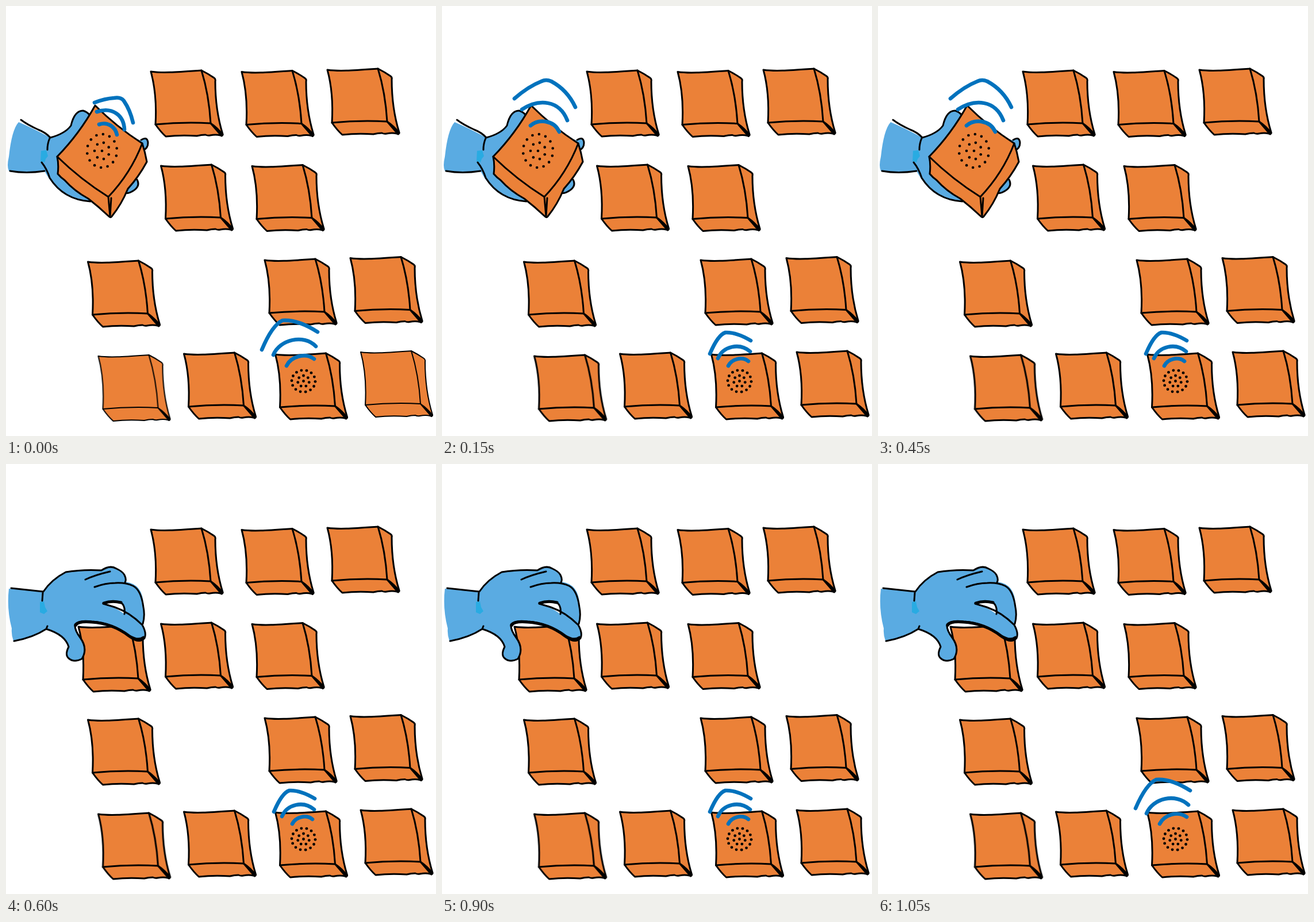
These frames come from a looping animation (748x748 px, 1200 ms). An HTML page:

```html
<!DOCTYPE html>
<html lang="en">
<head>
<meta charset="utf-8">
<title>Sounding tiles</title>
<style>
  html, body { margin: 0; width: 100%; height: 100%; overflow: hidden; background: #fff; }
  svg { display: block; width: 100vw; height: 100vh; }
  path, use { stroke-linecap: round; stroke-linejoin: round; }
  .ink { fill: none; stroke: #000; stroke-width: 3; }
  .clay { fill: #eb8138; }
  .glove { fill: #5aabe2; }
  .shade { fill: #29abe2; }
  .waves { fill: none; stroke: #0072bd; stroke-width: 6.6; }

  .held, .placing, .call-near, .call-far, .reply-wide, .reply-low, .reply-late, .fine, .bold {
    animation: 1.2s step-end infinite;
  }
  .held { animation-name: first-half; }
  .placing { animation-name: second-half; }
  .call-near, .reply-wide, .fine { animation-name: even-beats; }
  .call-far { animation-name: odd-beats; }
  .bold { animation-name: all-but-even; }
  .reply-low { animation-name: low-beats; }
  .reply-late { animation-name: late-beats; }

  @keyframes first-half { 0% { opacity: 1 } 50%, 100% { opacity: 0 } }
  @keyframes second-half { 0% { opacity: 0 } 50%, 100% { opacity: 1 } }
  @keyframes even-beats { 0%, 25% { opacity: 1 } 12.5%, 37.5%, 100% { opacity: 0 } }
  @keyframes odd-beats { 0%, 25%, 50%, 100% { opacity: 0 } 12.5%, 37.5% { opacity: 1 } }
  @keyframes all-but-even { 0%, 25% { opacity: 0 } 12.5%, 37.5%, 100% { opacity: 1 } }
  @keyframes low-beats { 0%, 25%, 62.5%, 87.5%, 100% { opacity: 0 } 12.5%, 37.5%, 75% { opacity: 1 } }
  @keyframes late-beats { 0%, 75%, 100% { opacity: 0 } 62.5%, 87.5% { opacity: 1 } }
</style>
</head>
<body>
<svg viewBox="0 0 748 748" xmlns="http://www.w3.org/2000/svg">
  <defs>
    <g id="tile">
      <path class="clay" stroke="#000" d="M0 0C20 3 45 1 88-2Q100 4 110 11Q113 13 112 17Q112 67 125 109Q125 113 121 111Q113 109 103 111Q99 112 95 110Q88 110 80 112Q52 110 26 113Q17 105 8 92Q11 40 0 0Z"/>
      <path fill="none" stroke="#000" d="M88-2Q101 40 104 90Q56 87.5 8 92"/>
      <path stroke="#000" d="M104 90Q116 98 125 110L123 112Z"/>
    </g>
  </defs>

  <g id="tiles" stroke-width="3"></g>

  <g class="held">
    <path class="glove" d="M22 202Q48 213 77 229Q103 222 113 208Q119 182 134 182Q141 184 146 190L165 210L235 234Q247 228 247 238Q247 248 239 251L220 300L228 302Q234 313 222 322Q211 328 205 325L147 340Q107 338 85 313Q73 299 67 287Q35 291 5 287Q1 279 5 262Q10 215 22 202Z"/>
    <path class="shade" d="M61 252L70 251L73 261L69 266L67 272L60 270Z"/>
    <path class="ink" d="M26 198Q38 207 56 215Q69 220 77 229Q103 222 113 208Q119 182 134 182Q141 184 146 190M76 230Q72 239 72 250M7 287Q35 292 67 287M62 272Q71 283 76 299Q100 337 147 340M235 233Q246 226 247 238Q247 247 239 251M228 302Q234 313 222 321Q213 327 207 325"/>
    <path class="clay" stroke="#000" stroke-width="3" d="M155 173Q192 210 237 239Q242 254 245 271Q231 297 212 318Q201 345 184 366Q182 369 179 366Q161 349 143 335Q119 322 102 303Q95 298 90 292Q92 276 89 262Q128 222 155 173Z"/>
    <path class="ink" d="M89 262Q130 302 178 332Q217 291 237 239M178 332L181 366L183 334"/>
    <g id="held-holes"></g>
    <g class="waves">
      <path class="call-near" d="M154 168Q172 161 188 160Q200 158 205 165Q216 181 221 203M158 184C185 175 205 190 206 215M162 206C177 201 190 210 193 224"/>
      <path class="call-far" d="M126 161Q150 140 173 131Q181 127 190 131Q218 146 232 176M139 180C168 161 204 163 218 199M154 208C168 196 195 198 204 219"/>
    </g>
  </g>

  <g class="placing">
    <use href="#tile" x="126" y="283" stroke-width="3"/>
    <path class="glove" fill-rule="evenodd" d="M5 217Q37 217 65 222Q79 201 104 188Q134 183 166 185Q181 175 192 182Q208 190 208 205Q240 209 239 249Q242 264 238 278Q245 294 241 303Q232 313 215 301Q185 276 149 274Q127 271 120 279Q119 289 129 302Q143 321 132 339Q118 346 108 337Q104 328 109 318Q103 297 70 287Q47 302 13 308Q9 297 10 286Q1 252 5 217ZM169 243Q181 238 200 241Q208 247 206 261Q190 249 169 243Z"/>
    <path class="shade" d="M59 240L66 239L68 249L72 256L66 261L59 258Z"/>
    <path class="ink" d="M9 216Q37 219 65 222Q79 201 104 188Q134 183 166 185Q181 175 192 182Q203 187 206 193Q210 201 207 206M138 201Q155 193 181 187M63 238L64 224M14 308Q47 302 70 287L72 282M70 287Q103 297 109 318Q102 332 109 338Q118 346 132 339Q143 321 129 302Q119 289 120 279Q127 271 149 274Q185 276 215 301Q232 313 241 303Q245 294 237 280Q215 258 189 249L169 243Q181 238 200 241Q208 247 206 261M154 214Q173 207 190 207Q208 206 221 212Q235 219 239 249Q242 264 238 278"/>
    <path class="ink" style="stroke-width:5" d="M121 281Q125 273 149 275Q185 277 214 299Q230 309 239 302M170 242Q184 237 200 241"/>
  </g>

  <g id="placed-holes"></g>
  <g class="waves">
    <path class="reply-wide" d="M445 598Q463 555 481 547Q508 545 542 567M465 607C476 580 518 570 539 592M488 626C495 610 521 602 536 614"/>
    <path class="reply-low" d="M466 605Q480 572 493 568Q512 567 537 582M480 613C489 592 517 585 536 601M498 626C504 614 522 609 533 618"/>
    <path class="reply-late" d="M448 599Q466 557 484 549Q510 547 543 568M467 608C478 581 518 572 540 593M490 626C498 610 521 603 537 614"/>
  </g>
</svg>

<script>
  const svgNode = (parent, name, attrs) => {
    const node = document.createElementNS("http://www.w3.org/2000/svg", name);
    for (const key in attrs) node.setAttribute(key, attrs[key]);
    return document.getElementById(parent).appendChild(node);
  };

  const addTile = (x, y, extra) => svgNode("tiles", "use", { href: "#tile", x, y, ...extra });

  [[252, 114], [410, 114.5], [559, 111], [269.5, 278], [428, 278.5], [142.5, 445],
   [450, 442], [599, 438.5], [309.5, 605], [468.5, 606]].forEach(([x, y]) => addTile(x, y));

  // The outer two tiles of the last row alternate between two line weights.
  [[160.5, 609], [617, 602]].forEach(([x, y]) => {
    addTile(x, y, { class: "fine", "stroke-width": 2 });
    addTile(x, y, { class: "bold" });
  });

  function addHoles(parent, cx, cy, r, rings) {
    svgNode(parent, "circle", { cx, cy, r });
    for (const [count, rx, ry, turn] of rings) {
      for (let i = 0; i < count; i++) {
        const a = turn + i / count * 2 * Math.PI;
        svgNode(parent, "circle", { cx: cx + rx * Math.cos(a), cy: cy + ry * Math.sin(a), r });
      }
    }
  }

  addHoles("held-holes", 167, 252, 2.3, [[14, 26, 29, -1.5], [7, 13, 14.5, -1.35]]);
  addHoles("placed-holes", 517.5, 652.5, 2.4, [[14, 20.5, 19, -1.75], [7, 10, 9.5, -1.57]]);
</script>
</body>
</html>
```
